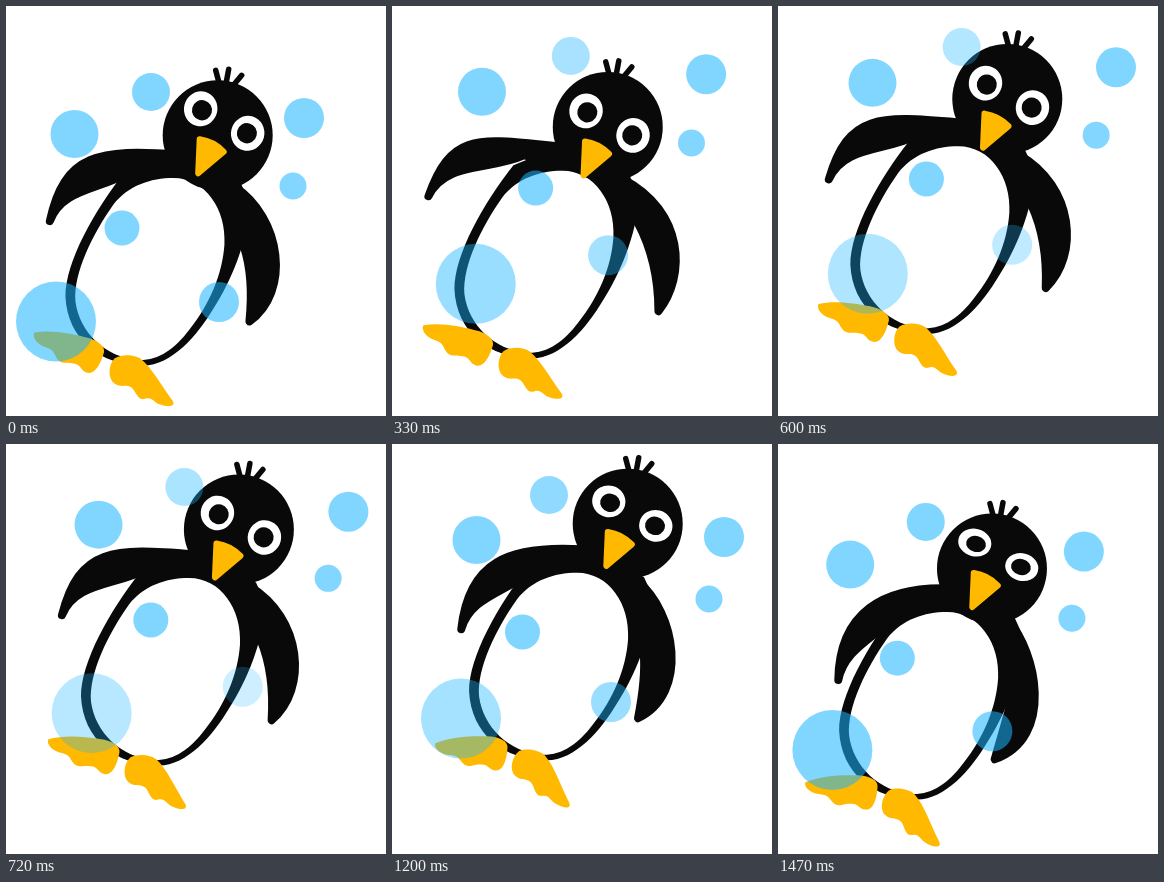
Write an HTML page with a canvas that moves like this. It is 380 px wide and 410 px high and loops after 1500 ms.

```html
<!DOCTYPE html>
<html lang="en">
<head>
<meta charset="utf-8">
<title>Dancing penguin</title>
<style>
html, body { margin: 0; width: 100%; height: 100%; overflow: hidden; background: #fff; }
canvas { display: block; width: 380px; height: 410px; }
</style>
</head>
<body>
<canvas id="stage"></canvas>
<script>
const W = 380, H = 410, LOOP = 1500, STEP = 30;
const BLACK = '#090909', YELLOW = '#ffb900', BLUE = '#1bb4ff';
const canvas = document.getElementById('stage');
const ctx = canvas.getContext('2d');
const dpr = window.devicePixelRatio || 1;
canvas.width = W * dpr;
canvas.height = H * dpr;

// Easing
const span = (t, from, to) => Math.min(1, Math.max(0, (t - from) / (to - from)));
const smooth = u => u * u * (3 - 2 * u);
const mix = (a, b, u) => a + (b - a) * u;
const mixAll = (a, b, u) => a.map((v, i) => mix(v, b[i], u));

// Body: hits the floor, springs up, falls again across the loop seam.
function lift(t) {
  if (t < 120) return 1 - smooth(span(t, -360, 120));
  if (t < 1140) return 1 - (1 - span(t, 210, 1140)) ** 2.5;
  return 1 - smooth(span(t, 1140, 1620));
}

// The face lags below the head while it rises.
const faceDip = t => 11 * Math.sin(Math.PI * (t / LOOP) ** .6);
const blink = t => 4 * (t / LOOP) ** 4;
const footTurn = t => smooth(span(t, 400, 1100));

// 0 = wings raised, 1 = wings down.
const droop = t => t < 330
  ? .4 * (1 - smooth(t / 330))
  : span(t, 330, LOOP) ** 1.2;

// Wing: start, two outer handles, tip, two inner handles, inner end.
const LEFT_UP = [168, 150, 82, 142, 53, 131, 29, 199, 46, 164, 90, 174, 125, 158];
const LEFT_DOWN = [168, 150, 99, 147, 55, 176, 55, 243, 60, 215, 86, 202, 102, 186];
const RIGHT_UP = [224, 182, 285, 214, 287, 279, 259, 314, 259, 283, 253, 253, 238, 225];
const RIGHT_DOWN = [224, 182, 251, 212, 271, 300, 209, 321, 216, 298, 222, 279, 226, 266];

// Bubbles: radius, home, kick offset, drift offset, sideways bow, fade depth and peak.
const bubble = (r, home, kick, drift, bow = 0, fade = 0, peak = 480) =>
  ({ r, home, kick, drift, bow, fade, peak });
const bubbles = [
  bubble(19, [145, 86], [44, -47], [12, -35], 0, .45),
  bubble(24, [68.5, 128], [28, -55], [16, -32]),
  bubble(20, [298, 112], [34, -57], [34, -19], 12),
  bubble(13.5, [287, 180], [26, -56], [30, -25], 9),
  bubble(17.5, [116, 222], [36, -52], [14.5, -34]),
  bubble(20, [213, 296], [17, -61], [6, -38], 12, .6, 720),
  bubble(40, [50, 315.5], [44, -49], [19, -41], 0, .58, 960)
];

function bubbleOffset({ kick, drift, bow }, t) {
  if (t >= 1200) return drift.map(v => v * (1 - span(t, 1200, LOOP) ** 2.5));
  const u = span(t, 0, 480), v = span(t, 480, 1200);
  const [x, y] = t < 480 ? kick.map(k => k * smooth(u)) : mixAll(kick, drift, v);
  return [x + bow * (Math.sin(Math.PI * v) - Math.sin(Math.PI * u)), y];
}

// Shapes
const torso = new Path2D('M114 168C84 206 55 257 55 292C57 335 90 361 133 361C161 361 187 331 203 304' +
  'C221 276 236 240 240 200L230 178L165 147Z');
const belly = new Path2D('M163 173.5C195 173.5 216 205 214 240C212 270 199 300 179 325C164 345 148 356 128 355.5' +
  'C95 353 69 328 65 297C63 268 82 230 103 200C118 181 140 173.5 163 173.5Z');
const leftFoot = new Path2D('M24 328C40 325 62 329 80 334C88 337 95 342 93.5 348C90 360 84 371 76 368' +
  'C70 366 71 360 63 359C55 357 54 360 48 356C43 350 45 346 36 343C28 341 21 333 24 328Z');
const rightFoot = new Path2D('M104 354C112 349 124 350 130 354C142 364 150 380 162 396C166 402 158 403 150 400' +
  'C143 398 142 392 135 394C127 397 126 387 121 383C114 379 112 384 104 379C97 374 98 360 104 354Z');
const beak = new Path2D('M192 135Q206 137 216 147.5L190.5 169Z');

const fill = (color, path) => { ctx.fillStyle = color; ctx.fill(path); };

function rounded(color, width, path) {
  ctx.strokeStyle = color;
  ctx.lineWidth = width;
  ctx.lineJoin = ctx.lineCap = 'round';
  ctx.stroke(path);
  fill(color, path);
}

function oval(color, x, y, rx, ry = rx, turn = 0) {
  ctx.fillStyle = color;
  ctx.beginPath();
  ctx.ellipse(x, y, rx, ry, turn, 0, 7);
  ctx.fill();
}

function group(x, y, draw) {
  ctx.save();
  ctx.translate(x, y);
  draw();
  ctx.restore();
}

function foot(path, x, y, degrees) {
  group(x, y, () => {
    ctx.rotate(degrees * Math.PI / 180);
    ctx.translate(-x, -y);
    fill(YELLOW, path);
  });
}

function wing(up, down, u, rootX, rootY) {
  const [sx, sy, ax, ay, bx, by, tx, ty, ...inner] = mixAll(up, down, u);
  const p = new Path2D();
  p.moveTo(sx, sy);
  p.bezierCurveTo(ax, ay, bx, by, tx, ty);
  p.bezierCurveTo(...inner);
  p.lineTo(rootX, rootY);
  p.closePath();
  rounded(BLACK, 8, p);
}

function drawBody(t) {
  const up = lift(t), u = droop(t), turn = footTurn(t);
  group(mix(1, 23, up), mix(7, -47, up), () => {
    fill(BLACK, torso);
    wing(LEFT_UP, LEFT_DOWN, u, 165, 172);
    wing(RIGHT_UP, RIGHT_DOWN, u, 222, 200);
    fill('#fff', belly);
    foot(leftFoot, 92, 348, -13 * turn);
    foot(rightFoot, 118, 360, 10 * turn);
  });
}

function drawHead(t) {
  const up = lift(t), dip = faceDip(t), ry = 17.5 - blink(t);
  group(mix(-3, 27, up), mix(8, -54, up), () => {
    oval(BLACK, 210, 131, 55);
    rounded(BLACK, 5.5, new Path2D('M212 81L208 66M218 81L221 65M224 83L234 71'));
    group(-.45 * dip, dip, () => {
      for (const [x, y, look] of [[193, 104.5, 1.3], [240, 129, -.8]]) {
        oval('#fff', x, y, 16.7, ry, .25);
        oval(BLACK, x + look, y + .5 + look * .7, 10, ry * .58, .25);
      }
      rounded(YELLOW, 6, beak);
    });
  });
}

function drawBubbles(t) {
  for (const b of bubbles) {
    const [dx, dy] = bubbleOffset(b, t);
    const fade = b.fade * Math.min(span(t, 0, b.peak), 1 - span(t, b.peak, 1440));
    ctx.globalAlpha = .55 * (1 - fade);
    oval(BLUE, b.home[0] + dx, b.home[1] + dy, b.r);
  }
  ctx.globalAlpha = 1;
}

const start = performance.now();
function frame() {
  const t = Math.floor((performance.now() - start) % LOOP / STEP) * STEP;
  ctx.setTransform(dpr, 0, 0, dpr, 0, 0);
  ctx.fillStyle = '#fff';
  ctx.fillRect(0, 0, W, H);
  drawBody(t);
  drawHead(t);
  drawBubbles(t);
  requestAnimationFrame(frame);
}
frame();
</script>
</body>
</html>
```
